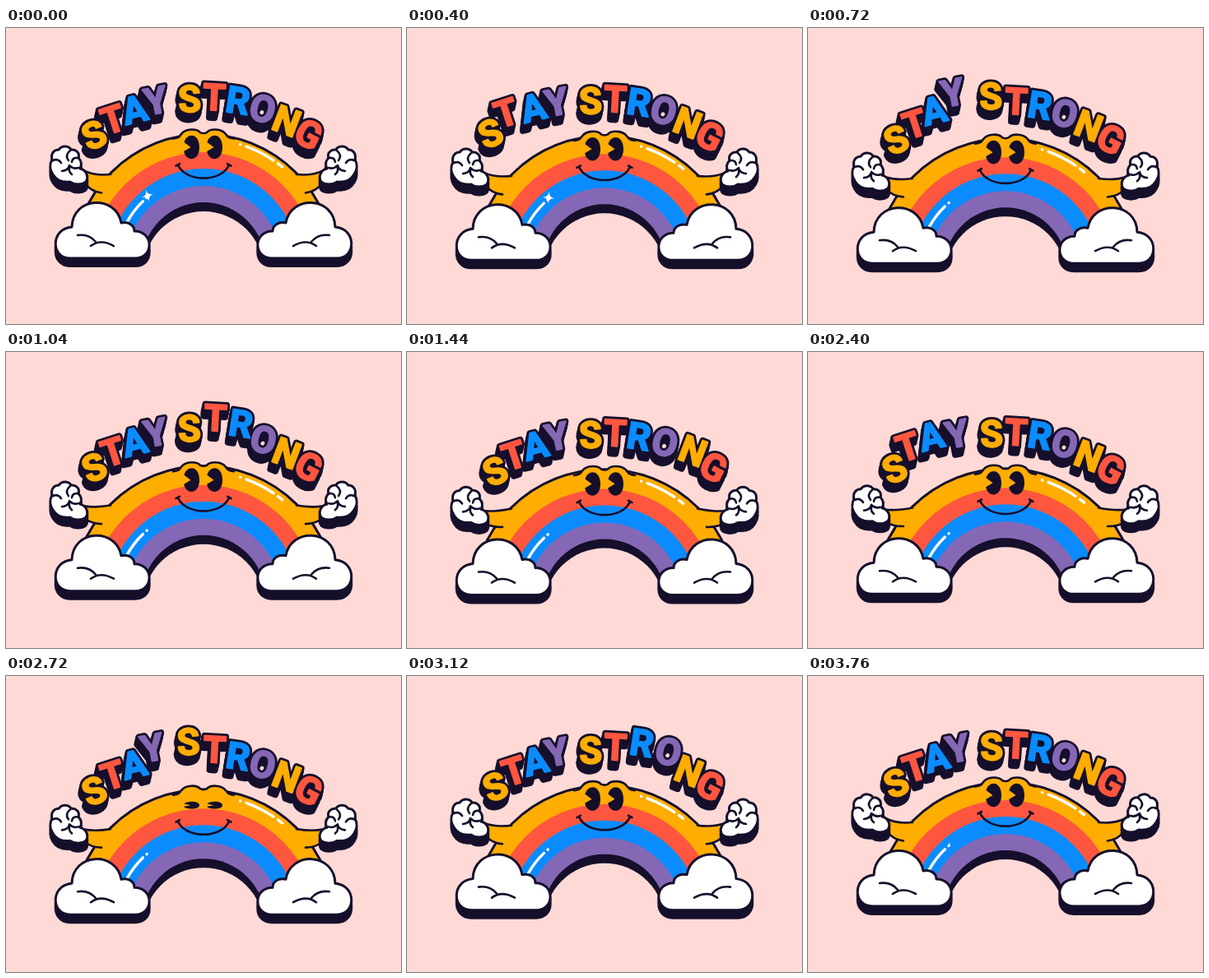
An HTML page that plays this animation: 480x360 px, repeating every 3840 ms.

```html
<!DOCTYPE html>
<html lang="en">
<head>
<meta charset="utf-8">
<title>Stay strong</title>
<style>
  html, body { margin: 0; width: 100%; height: 100%; overflow: hidden; background: #ffd9d6; }
  svg { display: block; width: 480px; height: 360px; }
  text { font: 700 45px Roboto, Arial, sans-serif; font-stretch: 82%; text-anchor: middle; }
  .ink { fill: #150f2b; stroke: #150f2b; stroke-width: 3; }
  .line { fill: none; stroke: #150f2b; stroke-width: 2.6; }
  .white { fill: #fff; stroke: #150f2b; stroke-width: 3; }
  .edge { fill: #150f2b; stroke: #150f2b; stroke-width: 7.5; }
  .shine { fill: none; stroke: #fff; stroke-width: 3.4; }
  .orange { fill: #ffad00; }
  .star { fill: #fff; stroke: #fff; stroke-width: .6; }
</style>
</head>
<body>
<svg viewBox="0 0 480 360" stroke-linecap="round" stroke-linejoin="round">
  <defs>
    <clipPath id="above"><path d="M0 0H480V266H0Z"/></clipPath>
    <path id="puff" d="M78 280C54 280 54 244 80 242C81 204.500 134 202.500 140 237C149 235 156 240 156 247C180 247 180 280 157 280Z"/>
    <g id="cloud">
      <use href="#puff" y="9.500" class="ink"/>
      <use href="#puff" y="5" class="ink"/>
      <use href="#puff" class="white"/>
      <path class="line" d="M87 252Q101 250 109 260M103 265Q115 256 131 265"/>
    </g>
    <path id="fist" d="M57 178C53 172 53 165 56 160C54 152 59 148 64 148C68 142 77 143 79 148C85 147 90 152 88 158C92 162 92 167 90 171C98 173 101 181 97 187C92 191 83 191 78 187C69 188 61 185 57 178Z"/>
    <g id="hand">
      <use href="#fist" y="10" class="ink"/>
      <use href="#fist" y="5" class="ink"/>
      <use href="#fist" class="white"/>
      <path class="line" d="M78 149Q71 155 76 161M87 158Q81 157 80 163M57 161Q63 158 67 164M68 174Q76 173 77 167Q82 172 88 170M77 170Q76 175 80 178"/>
    </g>
    <g id="side">
      <path class="orange arm"/>
      <path class="line armline"/>
      <use href="#hand" class="fistpos"/>
      <use href="#cloud" class="cloudpos"/>
    </g>
    <path id="eye" fill="#150f2b" d="M-1 0L-9 -6C-6 -18 9.500 -18 9.500 0C9.500 18 -7 18 -9.300 5Z"/>
    <path id="spark" class="star" d="M0 -20Q1 -2 20 0Q2 2 0 20Q-2 2 -20 0Q-1 -2 0 -20Z"/>
  </defs>

  <g id="bow">
    <g clip-path="url(#above)">
      <ellipse id="outer" class="orange" cx="240" cy="287" stroke="#150f2b" stroke-width="3"/>
      <circle cx="240" cy="287" r="136" fill="#ff5640"/>
      <circle cx="240" cy="287" r="116" fill="#0a8cff"/>
      <circle cx="240" cy="287" r="95" fill="#8568b5"/>
      <circle cx="240" cy="287" r="75" fill="#150f2b"/>
    </g>
    <circle cx="240" cy="296.500" r="73.500" fill="#ffd9d6"/>
    <path id="shines" class="shine"/>
    <path class="line" d="M209 166.500C218 188 262 188 271 166.500M206.500 167.500L211 165M269 165L273.500 167.500"/>
  </g>
  <g id="face">
    <path class="orange" d="M205 140C212 136 210 133 213 129C218 122 232 122 236 127Q240 129 244 127C248 122 262 122 267 129C270 133 268 136 275 140L262 148H218Z"/>
    <path class="line" d="M203 134.500C212 133 210 132 213 129C218 122 232 122 236 127Q240 129 244 127C248 122 262 122 267 129C270 132 268 133 277 134.500"/>
    <use href="#eye" class="eye"/>
    <use href="#eye" class="eye"/>
  </g>
  <use href="#side"/>
  <use href="#side" transform="matrix(-1 0 0 1 480 0)"/>
  <g id="edges"></g>
  <g id="word"></g>
  <g id="sparkA"><use href="#spark"/></g>
  <g id="sparkB">
    <use href="#spark"/>
    <path stroke="#fff" stroke-width="1.200" d="M-17 -26L-5 -8M8 17L15 31M-8 12L-13 18M8 -8L13 -13"/>
  </g>
</svg>
<script>
const LOOP = 3840, STEP = 80, DROP = 17.5;
const $ = s => document.querySelector(s);
const make = (tag, attrs, parent) => {
  const el = document.createElementNS('http://www.w3.org/2000/svg', tag);
  for (const k in attrs) el.setAttribute(k, attrs[k]);
  return parent.appendChild(el);
};
const place = (el, value) => el.setAttribute('transform', value);

const COLORS = ['#ffad00', '#ff5640', '#0a8cff', '#8568b5'];
// letter, x, y, tilt, colour
const letters = [
  ['S', 107, 130, -22, 0], ['T', 130, 111, -18, 1], ['A', 156, 99, -14, 2], ['Y', 182, 88, -11, 3],
  ['S', 223, 86, -3, 0], ['T', 253, 84, 3, 1], ['R', 282, 88, 9, 2], ['O', 312, 98, 14, 3],
  ['N', 341, 113, 21, 0], ['G', 368, 129, 27, 1]
].map(([char, x, y, tilt, color], i) => {
  const edge = make('g', { class: 'edge' }, $('#edges'));
  const face = make('g', { fill: COLORS[color], stroke: COLORS[color], 'stroke-width': 2 }, $('#word'));
  const id = 'letter' + i;
  make('text', { id, y: 16, transform: `rotate(${tilt})` }, face).textContent = char;
  for (let k = 0; k < 5; k++)
    make('use', { href: '#' + id, x: -k * .5, y: k * 2.3 }, edge);
  return { parts: [edge, face], x, y };
});

// Arc around the rainbow centre; angles in degrees from straight up.
function arc(r, from, to) {
  const at = a => `${240 + r * Math.sin(a * Math.PI / 180)} ${287 - r * Math.cos(a * Math.PI / 180)}`;
  return `M${at(from)}A${r} ${r} 0 0 ${to > from ? 1 : 0} ${at(to)}`;
}
$('#shines').setAttribute('d', arc(152, 17, 17.1) + arc(152, 20, 34) + arc(152, 36.5, 39)
  + arc(106, -40.5, -40.6) + arc(106, -44, -61));

function moveWord(t, dip) {
  const c = .007 * (t % (LOOP / 2) - 270);
  const height = Math.max(0, 17 - .35 * (c - 3.8) ** 2);
  letters.forEach(({ parts, x, y }, i) => {
    const pop = height * Math.exp(-((i - c) ** 2) / 1.2);
    const dx = x - 238, dy = y - 230, len = Math.hypot(dx, dy);
    const move = `translate(${x + dx / len * pop} ${y + 16.5 * dip + dy / len * pop})`;
    parts.forEach(part => place(part, move));
  });
}

function moveArm(dip) {
  const hand = 23 * dip, root = 14 * dip;
  const top = `M94 ${173 + hand}Q108 ${180 + hand * .7} 127 ${178 + root}`;
  const low = `116 ${200.5 + root}Q103 ${199 + hand * .7} 95 ${188 + hand}`;
  $('.arm').setAttribute('d', `${top}L132 ${186 + root}L${low}Z`);
  $('.armline').setAttribute('d', `${top}M${low}`);
  place($('.fistpos'), `translate(0 ${hand})`);
  place($('.cloudpos'), `translate(0 ${DROP * dip})`);
}

function sparkle(el, t, peak, x, y, turn) {
  const gap = (t - peak + LOOP * 1.5) % LOOP - LOOP / 2;
  const size = Math.max(0, 1 - Math.abs(gap) / 300);
  place(el, `translate(${x} ${y}) rotate(${turn + gap * .06}) scale(${size})`);
}

function draw(t) {
  const dip = (1 - Math.cos(2 * Math.PI * (t + 60) / LOOP)) / 2;
  const fall = DROP * dip;
  place($('#bow'), `translate(0 ${fall})`);
  $('#outer').setAttribute('rx', 158 + 3 * dip);
  $('#outer').setAttribute('ry', 158 + 2 * dip);
  place($('#face'), `translate(0 ${fall})`);
  const blink = Math.max(0, 1 - Math.abs(t - 2720) / 200);
  document.querySelectorAll('.eye').forEach((eye, i) =>
    place(eye, `translate(${225.5 + 28 * i} ${145 + 2 * blink}) scale(1 ${1 - .7 * blink})`));
  moveArm(dip);
  moveWord(t, dip);
  sparkle($('#sparkA'), t, 200, 172, 204 + fall, -5);
  sparkle($('#sparkB'), t, 2120, 284, 141.5 + fall, -18);
}

function tick(now) {
  draw(Math.floor(now % LOOP / STEP) * STEP);
  requestAnimationFrame(tick);
}
draw(0);
requestAnimationFrame(tick);
</script>
</body>
</html>
```
